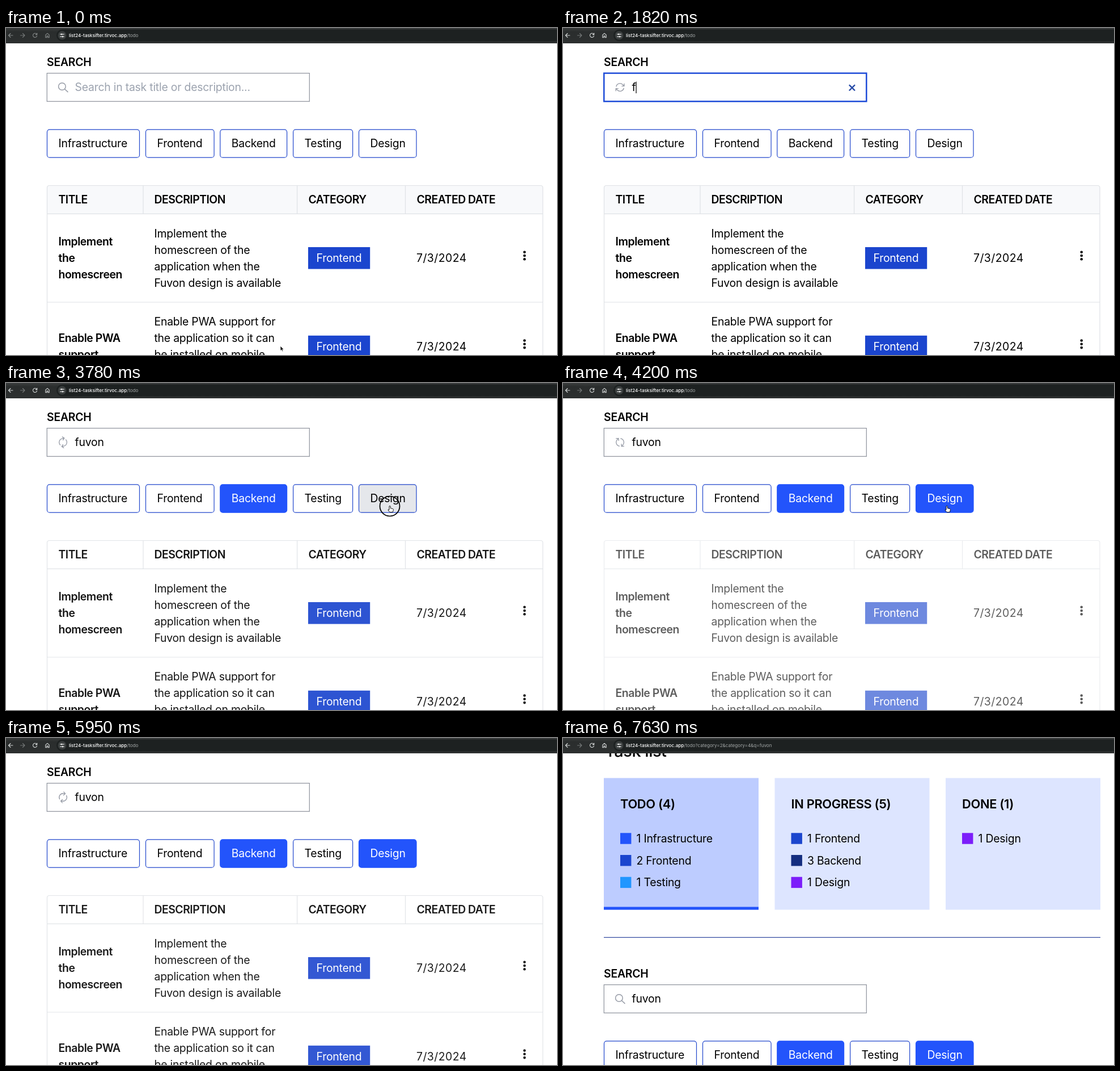
Write an HTML page that moves like this. It is 972 px wide and 576 px high and loops after 8.19 s.

```html
<!DOCTYPE html>
<html lang="en">
<head>
<meta charset="utf-8">
<title>Task list</title>
<style>
  html, body { margin: 0; width: 100%; height: 100%; overflow: hidden; background: #fff; }
  svg { display: block; width: 100%; height: 100%; }
  text { font: 19.4px Inter, sans-serif; letter-spacing: -.22px; white-space: pre; }
  .medium { font-weight: 600; letter-spacing: -.42px; }
  .head { font-weight: 600; letter-spacing: -.5px; }
  .bold { font-weight: 600; }
  .card { font-size: 21.8px; font-weight: 600; letter-spacing: -.3px; }
  .page-title { font-size: 29px; font-weight: 500; letter-spacing: -.5px; }
  .date { letter-spacing: .45px; }
  .url { font-size: 8.1px; font-weight: 500; letter-spacing: 0; fill: #fff; }
  .path { font-weight: 400; fill: #a4a8a8; }
  .line { fill: none; stroke-linecap: round; stroke-linejoin: round; }
</style>
</head>
<body>
<svg id="stage" viewBox="0 0 972 576"></svg>
<script>
const LOOP = 8190, STEP = 70;
const QUERY = "fuvon", PLACEHOLDER = "Search in task title or description...";
const KEY_TIMES = [1820, 1960, 2100, 2310, 2450];
const FOCUS = 1260, BLUR = 3010, LOADING = 3500, DONE = 7630;
const SPEED = .94;
const BLUE = "#2354fb", DEEP = "#1b45ce", NAVY = "#142d80", SKY = "#2196ff", VIOLET = "#7c1efa";

const buttons = [
  { label: "Infrastructure", x: 72.5, w: 163 },
  { label: "Frontend", x: 246.5, w: 120.6 },
  { label: "Backend", x: 377.8, w: 117.8, from: 3010 },
  { label: "Testing", x: 506.6, w: 105 },
  { label: "Design", x: 622.5, w: 101.5, from: 3850 },
];

// Pointer moves: start, end, then the three points of a quadratic curve
const moves = [
  [0, 770, [484, 560], [160, 330], [205, 106]],
  [2600, 2870, [205, 106], [320, 150], [436, 209]],
  [3220, 3570, [436, 209], [560, 209], [677, 217]],
];
const clicks = [[910, 1260], [2870, 3220], [3710, 4060]];

const text = (x, y, str, cls = "", fill = "#000") =>
  `<text x="${x}" y="${y}" class="${cls}" fill="${fill}">${str}</text>`;
const lines = (x, y, rows, cls) => rows.map((r, i) => text(x, y + i * 29, r, cls)).join("");
const rect = (x, y, w, h, fill, more = "") =>
  `<rect x="${x}" y="${y}" width="${w}" height="${h}" fill="${fill}" ${more}/>`;
const stroke = (d, color, width = 1) =>
  `<path class="line" d="${d}" stroke="${color}" stroke-width="${width}"/>`;

function card(x, title, items, active) {
  return rect(x, -284.5, 273, 232, active ? "#bdccff" : "#dde5ff")
    + (active ? rect(x, -57.5, 273, 5, BLUE) : "")
    + text(x + 29, -231, title, "card")
    + items.map(([label, color], i) =>
        rect(x + 29, -187.7 + i * 38.7, 19.4, 19.4, color)
        + text(x + 57.5, -171 + i * 38.7, label)).join("");
}

function taskRow(y, title, titleY, description) {
  const dots = [-10.3, -4, 2.3].map(d => `<circle cx="914.7" cy="${y + d}" r="2.3"/>`).join("");
  return lines(92.5, titleY, title, "medium")
    + lines(261.5, y - 36.5, description)
    + rect(533, y - 19, 109.2, 38.5, DEEP)
    + text(547.5, y + 7, "Frontend", "", "#fff")
    + text(724, y + 7, "7/3/2024", "date") + dots;
}

const toolbar = `
  <linearGradient id="bar" x2="0" y2="1">
    <stop stop-color="#3a3d3e"/><stop offset=".25" stop-color="#2a2d2d"/><stop offset="1" stop-color="#2d3030"/>
  </linearGradient>
  ${rect(0, 0, 972, 27, "url(#bar)")}
  ${rect(89, 2.5, 900, 21, "#1d2121", 'rx="10.5"')}
  <g id="nav">
    ${stroke("M12 13H4.5M8 9.5 4.5 13 8 16.5M54.3 11.2a3.6 3.6 0 1 0 .3 2.6M54.8 9v2.6h-2.6M69.8 12.2V16.7H72v-2.6h2v2.6h2.2V12.2L73 9.4Z", "currentColor", 1.1)}
  </g>
  ${stroke("M25.5 13H33M29.5 9.5 33 13 29.5 16.5", "#757979", 1.1)}
  <circle cx="99" cy="13" r="7.5" fill="#3b3f3f"/>
  ${stroke("M95.5 11H97M100 11H102.5M95.5 15.2H98M101 15.2H102.5", "#fff", 1)}
  ${stroke("M98.3 11h.1M99.6 15.2h.1", "#fff", 2.4)}
  <text class="url" x="111" y="16">list24-tasksifter.tirvoc.app<tspan class="path" id="path"></tspan></text>`;

const cards = text(74, -322.5, "Task list", "page-title")
  + card(72, "TODO (4)", [["1 Infrastructure", BLUE], ["2 Frontend", DEEP], ["1 Testing", SKY]], true)
  + card(373.5, "IN PROGRESS (5)", [["1 Frontend", DEEP], ["3 Backend", NAVY], ["1 Design", VIOLET]])
  + card(675, "DONE (1)", [["1 Design", VIOLET]])
  + rect(72, -4.3, 876, 1.2, "#2c449e");

const search = `
  ${text(72, 66.5, "SEARCH", "bold")}
  <rect id="box" x="72.3" y="79.6" width="463" height="49.7" fill="#fff"/>
  <g id="glass">${stroke("M105.2 103a6.3 6.3 0 1 1-12.6 0a6.3 6.3 0 1 1 12.6 0M103.5 107.5 109 112.6", "#969ba6", 1.5)}</g>
  <g id="spinner"><g transform="scale(.82) translate(-12 -12)">${stroke("M16 9.35h5V4.36M3 19.64v-5h5M3 14.65l3.2 3.18a8.25 8.25 0 0 0 13.8-3.7M4 9.87a8.25 8.25 0 0 1 13.8-3.7L21 9.35", "#969ba6", 1.6)}</g></g>
  <text id="query" x="121.5" y="111"></text>
  <rect id="caret" y="94.5" width="1.2" height="20.5"/>
  <g id="clear">${stroke("M505.5 100.8 514.3 109.6M514.3 100.8 505.5 109.6", "#2a4da8", 2.4)}</g>`;

const filters = buttons.map(b => `<g class="filter">
  ${rect(b.x, 178.8, b.w, 49.4, "#fff", `rx="4.5" stroke="#2046cc" stroke-width="1.2"`)}
  ${text(b.x + 20, 210.3, b.label)}</g>`).join("");

const table = `<g id="table">
  <path id="header" d="M72.5 327.3V281.5q0-4 4-4H943q4 0 4 4v45.8z"/>
  ${stroke("M72.5 580V281.5q0-4 4-4H943q4 0 4 4V580M72.5 327.3H947M72.5 483H947M242 277.5V327M513.6 277.5V327M704.5 277.5V327", "#dfe2e6", 1.2)}
  ${text(92.5, 309, "TITLE", "head")}${text(261.5, 309, "DESCRIPTION", "head")}
  ${text(533.5, 309, "CATEGORY", "head")}${text(724.5, 309, "CREATED DATE", "head")}
  ${taskRow(405, ["Implement", "the", "homescreen"], 383,
    ["Implement the", "homescreen of the", "application when the", "Fuvon design is available"])}
  ${taskRow(560.8, ["Enable PWA", "support"], 553.3,
    ["Enable PWA support for", "the application so it can", "be installed on mobile"])}
</g>`;

const outline = 'stroke="#fff" stroke-width=".8" stroke-linejoin="round"';
const pointer = `<g id="pointer">
  <circle id="ring" r="17.5" fill="none" stroke="#000" stroke-width="1.7"/>
  <path id="arrow" d="M0 0V8.6L2 6.8 3.4 9.8 4.8 9.2 3.5 6.3H6Z" ${outline}/>
  <g id="beam">${stroke("M-2.5-7.5Q0-7.5 0-5.5V5.5Q0 7.5-2.5 7.5M2.5-7.5Q0-7.5 0-5.5M0 5.5Q0 7.5 2.5 7.5", "#000", 1.1)}</g>
  <path id="hand" d="M-1 0Q.2-1.2 1.2 0V3.6L5.5 4.6Q6.7 5 6.4 6.5L5.2 10.5H0L-3 6.8Q-3 5.2-1 6.4Z" fill="#fff" stroke="#000" stroke-width=".9" stroke-linejoin="round"/>
</g>`;

const stage = document.getElementById("stage");
stage.innerHTML = `<g id="page">${cards}${search}${filters}${table}</g>${toolbar}${pointer}`;

const el = id => document.getElementById(id);
const show = (id, on) => el(id).setAttribute("display", on ? "inline" : "none");
const set = (node, attrs) => Object.entries(attrs).forEach(([k, v]) => node.setAttribute(k, v));
const filterNodes = [...document.querySelectorAll(".filter")];
const during = (t, [a, b]) => t >= a && t < b;

function pointerAt(t) {
  const [start, end, a, c, b] = moves.filter(m => t >= m[0]).pop();
  const p = Math.min(1, (t - start) / (end - start));
  const k = p * p * (3 - 2 * p);
  return [0, 1].map(i => (1 - k) ** 2 * a[i] + 2 * k * (1 - k) * c[i] + k * k * b[i]);
}

function drawSearch(t) {
  const focused = during(t, [FOCUS, BLUR]);
  const typed = KEY_TIMES.filter(k => t >= k).length;
  const busy = during(t, [KEY_TIMES[0], DONE]);
  const query = el("query");
  query.textContent = typed ? QUERY.slice(0, typed) : PLACEHOLDER;
  query.setAttribute("fill", typed ? "#000" : "#9ca3af");
  set(el("box"), { stroke: focused ? "#1d4bd8" : "#8d929c", "stroke-width": focused ? 2.5 : 1.2 });
  el("caret").setAttribute("x", 121.5 + (typed ? query.getComputedTextLength() : 0));
  show("caret", focused);
  show("clear", focused && typed);
  show("glass", !busy);
  show("spinner", busy);
  const angle = (t - KEY_TIMES[0]) * .36 * SPEED;
  el("spinner").setAttribute("transform", `translate(100.6 104.5) rotate(${angle})`);
}

function drawPointer(t) {
  const [x, y] = pointerAt(t);
  const visible = t < 1400 || during(t, [2660, 4270]);
  const overButton = b => visible && x > b.x && x < b.x + b.w && y > 178 && y < 229;
  const overInput = x > 72 && x < 536 && y > 79 && y < 130;
  const hand = buttons.some(overButton);

  buttons.forEach((b, i) => {
    const active = t >= b.from;
    const [box, label] = filterNodes[i].children;
    set(box, { fill: active ? BLUE : overButton(b) ? "#e5e7eb" : "#fff", stroke: active ? BLUE : "#2046cc" });
    label.setAttribute("fill", active ? "#fff" : "#000");
  });
  show("pointer", visible);
  show("ring", clicks.some(c => during(t, c)));
  show("hand", hand);
  show("beam", overInput);
  show("arrow", !hand && !overInput);
  el("pointer").setAttribute("transform", `translate(${x} ${y})`);
}

function draw(time) {
  const t = Math.floor(time % LOOP / STEP) * STEP;
  const done = t >= DONE, loading = t >= LOADING && !done;
  drawSearch(t);
  drawPointer(t);
  const pulse = .75 + .25 * Math.cos(Math.PI * (t - LOADING) / 1000 * SPEED);
  el("table").setAttribute("opacity", loading ? pulse : 1);
  el("header").setAttribute("fill", loading ? "#fff" : "#f8f9fb");
  el("nav").setAttribute("color", t < 910 ? "#858989" : "#d5d8d8");
  el("path").textContent = done ? `/todo?category=2&category=4&q=${QUERY}` : "/todo";
  el("page").setAttribute("transform", `translate(0 ${done ? 355 : 0})`);
}

const begin = performance.now();
(function tick() {
  draw(performance.now() - begin);
  requestAnimationFrame(tick);
})();
</script>
</body>
</html>
```
